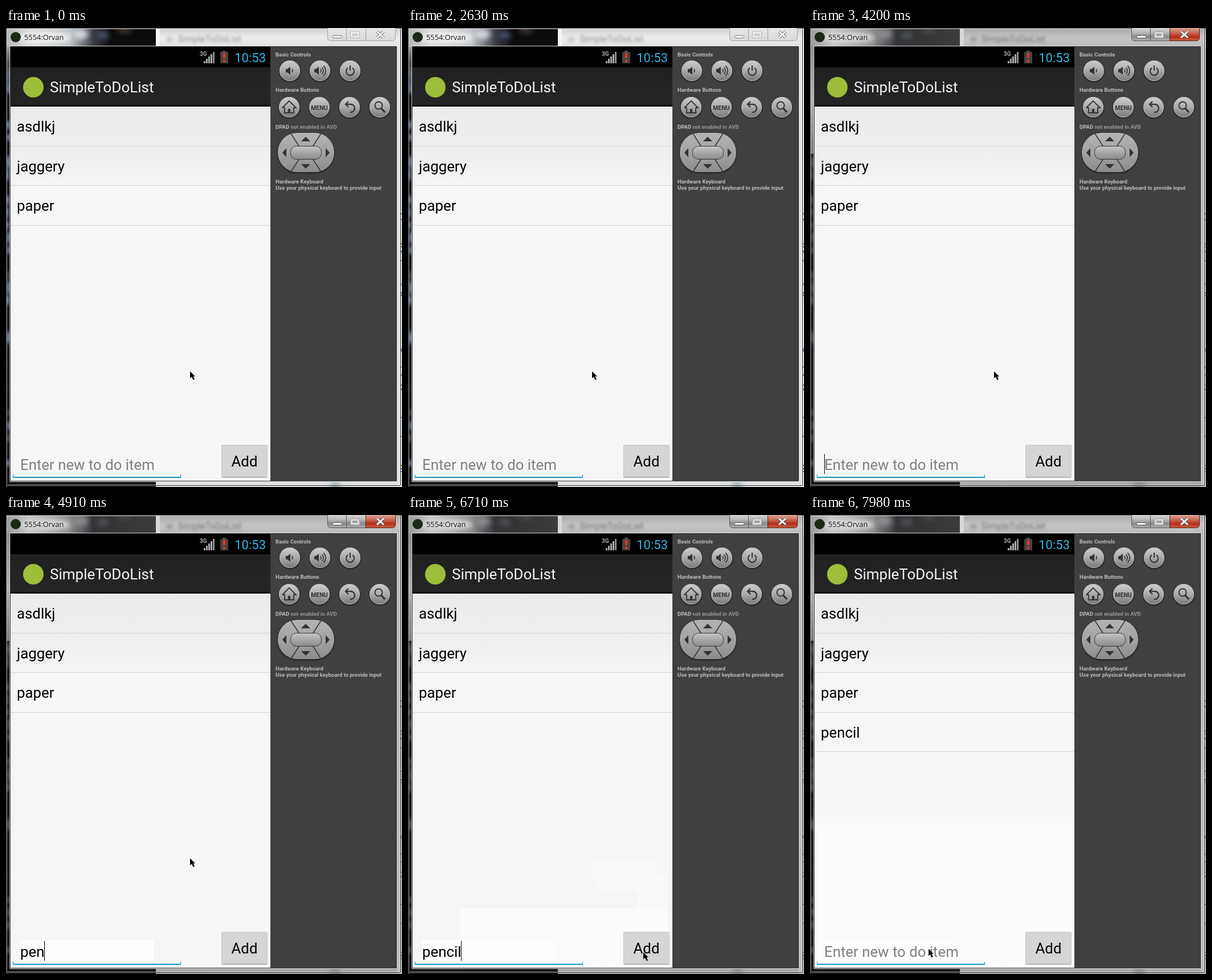
These frames come from a looping animation (695x806 px, 8 s). An HTML page with a canvas:

```html
<!DOCTYPE html>
<html lang="en">
<head>
<meta charset="utf-8">
<title>To-do list</title>
<style>
html, body { margin: 0; width: 100%; height: 100%; overflow: hidden; background: #222; }
canvas { display: block; }
</style>
</head>
<body>
<canvas id="stage" width="695" height="806"></canvas>
<script>
const W = 695, H = 806, LOOP = 8000;
const FOCUS_AT = 3050, ADD_AT = 7140;
const SANS = 'Roboto, sans-serif';
const BODY = '25.8px ' + SANS;
const ITEMS = ['asdlkj', 'jaggery', 'paper'];
const WORD = 'pencil';
const KEY_TIMES = [4500, 4630, 4910, 5180, 5330, 5600];
const CARET_TOGGLES = [150, 700, 1140, 1600, 2160, 2630, 3170, 3760, 4200, 6170, 6710, 7700];
const POINTER = [[0, 323, 603], [6310, 332, 610], [6430, 404, 630], [6560, 425, 690],
  [6710, 413, 768], [7700, 351, 758], [7850, 262, 744], [7980, 208, 762]];

const stage = document.getElementById('stage').getContext('2d');
let g = stage;

function rect(x, y, w, h, fill) { g.fillStyle = fill; g.fillRect(x, y, w, h); }

function ramp(x0, y0, x1, y1, ...stops) {
  const grad = g.createLinearGradient(x0, y0, x1, y1);
  stops.forEach((s, i) => Array.isArray(s)
    ? grad.addColorStop(s[0], s[1])
    : grad.addColorStop(i / (stops.length - 1), s));
  return grad;
}

function text(str, x, y, font, fill, align = 'left') {
  g.font = font; g.fillStyle = fill; g.textAlign = align;
  g.fillText(str, x, y);
}

function path(points, close = true) {
  g.beginPath();
  points.forEach(([x, y]) => g.lineTo(x, y));
  if (close) g.closePath();
}

function fillPath(points, fill) { path(points); g.fillStyle = fill; g.fill(); }

function strokeLine(points, color, width = 1) {
  path(points, false);
  g.strokeStyle = color; g.lineWidth = width; g.stroke();
}

function disc(x, y, r, fill) {
  g.beginPath(); g.arc(x, y, r, 0, 7);
  g.fillStyle = fill; g.fill();
}

function roundBox(x, y, w, h, r, fill, line) {
  g.beginPath(); g.roundRect(x, y, w, h, r);
  if (fill) { g.fillStyle = fill; g.fill(); }
  if (line) { g.strokeStyle = line; g.lineWidth = 1; g.stroke(); }
}

function random(seed) {
  return () => (seed = (seed * 16807) % 2147483647) / 2147483647;
}

function blob(x, y, rx, ry, color, blur = 5) {
  g.save();
  g.filter = `blur(${blur}px)`;
  g.beginPath(); g.ellipse(x, y, rx, ry, 0, 0, 7);
  g.fillStyle = color; g.fill();
  g.restore();
}

function clipped(x, y, w, h, paint) {
  g.save();
  g.beginPath(); g.rect(x, y, w, h); g.clip();
  paint();
  g.restore();
}

function titleGlass(focused) {
  rect(0, 0, 263, 33, ramp(0, 0, 263, 0, [0, focused ? '#9a9b9d' : '#b4b6b8'], [.15, focused ? '#c4c5c6' : '#dcdddd'],
    [.42, focused ? '#8b8c8e' : '#c3c8cc'], [.58, focused ? '#343539' : '#3c3f47'],
    [.7, focused ? '#343436' : '#0c0c0e'], [1, focused ? '#3c3c3e' : '#0c0c0e']));
  blob(68, 17, 46, 9, focused ? '#dcdddd' : '#f2f2f2');
  blob(130, 11, 14, 9, focused ? '#8b8b8d' : '#d2d8dc');
  blob(170, 13, 10, 5, focused ? '#555861' : '#4e607f');
  blob(208, 4, 13, 4, focused ? '#514c48' : '#574434');
  rect(263, 0, 7, 33, focused ? '#d8d8d8' : '#f4f4f4');
  rect(270, 0, W - 270, 33, focused
    ? ramp(0, 0, 0, 33, '#a8a8a8', '#c4c4c4', '#bcbcbc')
    : ramp(0, 0, 0, 33, '#d0d0d0', '#ececec', '#e2e2e2'));
  blob(287, 20, 5, 4, focused ? '#909090' : '#b7babd', 3);
  g.filter = 'blur(2px)';
  text('SimpleToDoList', 301, 25, '16px ' + SANS, focused ? '#777' : '#92979c');
}

function leftGlass(focused) {
  const rnd = random(41);
  rect(0, 33, 7, 773, '#141519');
  for (let y = 60; y < 790; y += 22) {
    const tone = rnd();
    const color = tone > .6 ? (focused ? '#5b5e64' : '#7f95b6') : tone > .4 ? '#57534f' : '#1b1d24';
    blob(rnd() * 7, y, 4, 5 + rnd() * 9, color, 3);
  }
  if (focused) rect(0, 33, 7, 188, ramp(0, 33, 0, 221, '#898b8e', '#b0b1b3', '#77797c'));
  else rect(0, 33, 7, 75, ramp(0, 33, 0, 108, 'rgba(154,156,160,1)', 'rgba(37,39,43,0)'));
}

function rightGlass(focused) {
  const rnd = random(77);
  rect(686, 33, 9, 773, focused ? '#bcbcbe' : '#e3e4e5');
  for (let i = 0; i < 21; i++) {
    const y = 325 + rnd() * 455;
    rect(693, y, 2, 2, ['#555', '#9b7130', '#775487', '#56779b'][i % 4]);
  }
}

function glass(focused) {
  rect(0, 0, W, H, focused ? '#c2c2c2' : '#dedede');
  clipped(0, 0, W, 33, () => titleGlass(focused));
  clipped(0, 33, 7, 773, () => leftGlass(focused));
  rightGlass(focused);
  rect(0, 797, 263, 9, '#17181b');
  rect(263, 797, 423, 9, focused ? '#a8a9aa' : '#e0e1e2');
  blob(578, 804, 10, 4, focused ? '#5e6368' : '#637f8d');
  frameLines();
}

function frameLines() {
  rect(0, 0, 1, H, '#303030');
  rect(1, 1, 1, H - 2, 'rgba(255,255,255,.45)');
  rect(691, 4, 1, 798, '#eeeeee');
  rect(692, 2, 1, 801, '#333');
  rect(3, 802, 688, 1, 'rgba(225,225,225,.65)');
  rect(2, 803, 690, 1, '#333');
  rect(0, 0, W, 1, '#444');
  rect(2, 1, 689, 1, 'rgba(255,255,255,.72)');
  roundBox(6.5, 31.5, 680, 765, 1, null, 'rgba(230,230,230,.75)');
  roundBox(7.5, 32.5, 678, 763, 0, null, '#333');
}

function titleBar(focused) {
  disc(17, 16, 9, '#1c2915');
  text('5554:Orvan', 32, 21, '12.8px "Open Sans", sans-serif', '#111');

  const edge = focused ? '#555' : '#a0a3a6';
  const plain = focused ? ramp(0, 0, 0, 23, '#d6d6d6', '#b9b9b9', '#898989', '#b3b3b3')
    : ramp(0, 0, 0, 23, '#e6e6e6', '#dadada');
  const red = focused ? ramp(0, 0, 0, 23, '#dea596', '#ca6d59', '#b52e19', '#cd6145') : plain;
  roundBox(564.5, -4.5, 33, 27, [0, 0, 0, 5], plain, edge);
  roundBox(597.5, -4.5, 34, 27, 0, plain, edge);
  roundBox(631.5, -4.5, 52, 27, [0, 0, 5, 0], red, focused ? '#552219' : edge);
  const ink = focused ? '#55585c' : '#74787d';
  roundBox(573.5, 13.5, 16, 4, 1, '#fff', ink);
  roundBox(604.5, 6.5, 16, 11, 1, focused ? '#ddd' : '#eee', focused ? '#92969a' : '#adb0b3');
  roundBox(608.5, 10.5, 8, 3, 0, focused ? '#aaa' : '#e0e0e0', focused ? '#92969a' : '#adb0b3');
  const cross = (color, width) => {
    strokeLine([[651, 6], [663, 17]], color, width);
    strokeLine([[663, 6], [651, 17]], color, width);
  };
  cross(ink, 5);
  cross('#fff', 2.8);
}

function statusBar() {
  rect(8, 33, 456, 36, '#000');
  text('3G', 340, 49, 'bold 10px ' + SANS, '#aaa');
  for (let i = 0; i < 5; i++) {
    const h = 4 + i * 4;
    rect(347 + i * 4, 62 - h, 3, h, i < 4 ? '#aaa' : '#8d8d8d');
  }
  rect(380, 40, 6, 3, '#555');
  roundBox(376, 42, 14, 20, 1, '#444');
  rect(381, 44, 4, 9, '#ee3524');
  rect(381, 56, 4, 4, '#ee3524');
  text('10:53', 456, 60, '22px ' + SANS, '#33b5e5', 'right');
}

function appChrome() {
  statusBar();
  rect(8, 69, 456, 67, ramp(0, 69, 0, 136, '#202020', '#252525'));
  rect(8, 135, 456, 3, '#080808');
  disc(48, 104, 18, '#9dbd3b');
  text('SimpleToDoList', 77, 113, '26px ' + SANS, '#f3f3f3');
  rect(8, 138, 456, 657, ramp(0, 138, 0, 795,
    [0, '#ebebeb'], [.105, '#eeeeee'], [.16, '#f0f0f0'], [.22, '#f6f6f6'], [1, '#f6f6f6']));
  ITEMS.forEach(listRow);
}

function listRow(label, i) {
  text(label, 19, 182 + i * 69.5, BODY, '#000');
  rect(8, Math.round(207 + i * 69.4), 456, 1, '#d2d2d2');
}

function knob(x, y) {
  disc(x, y + 1, 19.5, '#292929');
  disc(x, y, 18, ramp(0, y - 18, 0, y + 18, '#cecece', '#aaa', '#777'));
  g.strokeStyle = '#b8b8b8'; g.lineWidth = 1;
  g.beginPath(); g.arc(x, y, 17.5, 0, 7); g.stroke();
}

function arc(x, y, r, from, to, width = 2) {
  g.beginPath(); g.arc(x, y, r, from, to);
  g.strokeStyle = '#333'; g.lineWidth = width; g.stroke();
}

function speaker(x, y, waves) {
  fillPath([[x - 8, y - 3], [x - 5, y - 3], [x, y - 7], [x, y + 7], [x - 5, y + 3], [x - 8, y + 3]], '#333');
  for (let i = 0; i < waves; i++) arc(x, y, 4 + i * 4, -.8, .8, 1.7);
}

function dpad() {
  roundBox(475.5, 183, 102, 73, 36, '#2b2b2b');
  g.save();
  g.beginPath(); g.roundRect(477, 184, 99, 69, 34);
  g.fillStyle = ramp(0, 184, 0, 253, '#b4b4b4', '#a2a2a2', '#8c8c8c');
  g.fill(); g.clip();
  for (const sx of [-1, 1]) for (const sy of [-1, 1])
    strokeLine([[526.5 + sx * 10, 219 + sy * 8], [526.5 + sx * 28, 219 + sy * 36]], '#333', 1.5);
  g.restore();
  roundBox(499.5, 207.5, 54, 23, 10, ramp(0, 207, 0, 231, '#c6c6c6', '#898989'), '#383838');
  fillPath([[526, 191], [534, 199], [518, 199]], '#333');
  fillPath([[526, 247], [534, 239], [518, 239]], '#333');
  fillPath([[485, 219], [492, 211], [492, 227]], '#333');
  fillPath([[568, 219], [561, 211], [561, 227]], '#333');
}

function sidePanel() {
  rect(464, 33, 221, 762, '#404040');
  const label = (str, y, x = 473, color = '#bdbdbd') => text(str, x, y, 'bold 9.5px ' + SANS, color);
  label('Basic Controls', 50);
  label('Hardware Buttons', 112);
  label('DPAD', 177);
  label('not enabled in AVD', 177, 473 + g.measureText('DPAD ').width, '#979797');
  label('Hardware Keyboard', 273);
  label('Use your physical keyboard to provide input', 283.5);

  [498, 551, 604].forEach(x => knob(x, 75));
  [497, 550, 603, 656].forEach(x => knob(x, 139));
  speaker(499, 75, 1);
  speaker(549, 75, 3);
  arc(604, 76, 7, -.95, 4.1);
  strokeLine([[604, 66], [604, 75]], '#333', 2);

  strokeLine([[485, 140], [497, 128], [509, 140], [505, 140], [505, 149], [489, 149], [489, 140], [485, 140]], '#333', 1.8);
  rect(495, 142, 4, 7, '#333');
  text('MENU', 550, 143.5, 'bold 10.5px ' + SANS, '#333', 'center');
  arc(605, 141, 7, -1.57, 1.7, 2.3);
  strokeLine([[605, 134], [596, 134]], '#333', 2.3);
  strokeLine([[601, 129], [596, 134], [601, 139]], '#333', 2.3);
  arc(654, 136, 6.5, 0, 7);
  strokeLine([[658.5, 141], [665, 148]], '#333', 3.3);
  dpad();
}

function buildWindow(focused) {
  const layer = document.createElement('canvas');
  layer.width = W; layer.height = H;
  g = layer.getContext('2d');
  glass(focused);
  titleBar(focused);
  appChrome();
  sidePanel();
  g = stage;
  return layer;
}

function typed(t) {
  return t < ADD_AT ? WORD.slice(0, KEY_TIMES.filter(k => t >= k).length) : '';
}

function caretOn(t) {
  return CARET_TOGGLES.filter(k => t >= k).length % 2 === 1;
}

// Repainted areas come out slightly lighter than the rest of the page.
function freshPaint(t) {
  const light = '#fcfcfc';
  const caretPainted = (t >= 700 && t < FOCUS_AT) || t >= 3760;
  if (t >= ADD_AT) {
    rect(8, 370, 456, 425, ramp(0, 370, 0, 795, [0, '#f5f5f5'], [.36, '#f8f8f8'], [.42, light], [1, light]));
  } else {
    POINTER.slice(1, 4).forEach(([at, x, y], i) => {
      const [, px, py] = POINTER[i];
      if (t >= at) rect(px - 1, py, x + 31 - px, y + 30 - py, '#fafafa');
    });
    if (t >= 6710) rect(91, 691, 365, 104, light);
  }
  if (t >= KEY_TIMES[0]) rect(25, 747, 234, 37, '#fefefe');
  else if (caretPainted) rect(25, 747, 2, 37, '#fefefe');
}

function entryBar(t) {
  const value = typed(t);
  const accent = '#159ac5';
  text(value || 'Enter new to do item', 25, 776, BODY, value ? '#000' : '#808080');
  if (caretOn(t)) {
    g.font = BODY;
    rect(25 + Math.round(g.measureText(value).width), 748, 1, 35, '#000');
  }
  rect(12, 788, 295, 2, accent);
  rect(12, 784, 1, 4, accent);
  rect(306, 784, 1, 4, accent);

  roundBox(378, 732, 81, 58, 2, '#c4c4c4');
  rect(379, 733, 79, 55, '#d5d5d5');
  rect(379, 788, 79, 1, '#aaa');
  text('Add', 418.5, 770, BODY, '#000', 'center');
}

function pointer(t) {
  const [, x, y] = POINTER.filter(p => t >= p[0]).pop();
  fillPath([[0, 0], [0, 12], [3, 9.5], [5.5, 15], [8, 14], [5.5, 8.7], [9, 8.7]]
    .map(([dx, dy]) => [x + dx, y + dy]), '#000');
}

const idle = buildWindow(false), active = buildWindow(true);

function draw(t) {
  stage.drawImage(t < FOCUS_AT ? idle : active, 0, 0);
  freshPaint(t);
  if (t >= ADD_AT) listRow(WORD, 3);
  entryBar(t);
  pointer(t);
}

let start;
function tick(now) {
  start ??= now;
  draw((now - start) % LOOP);
  requestAnimationFrame(tick);
}
draw(0);
requestAnimationFrame(tick);
</script>
</body>
</html>
```
